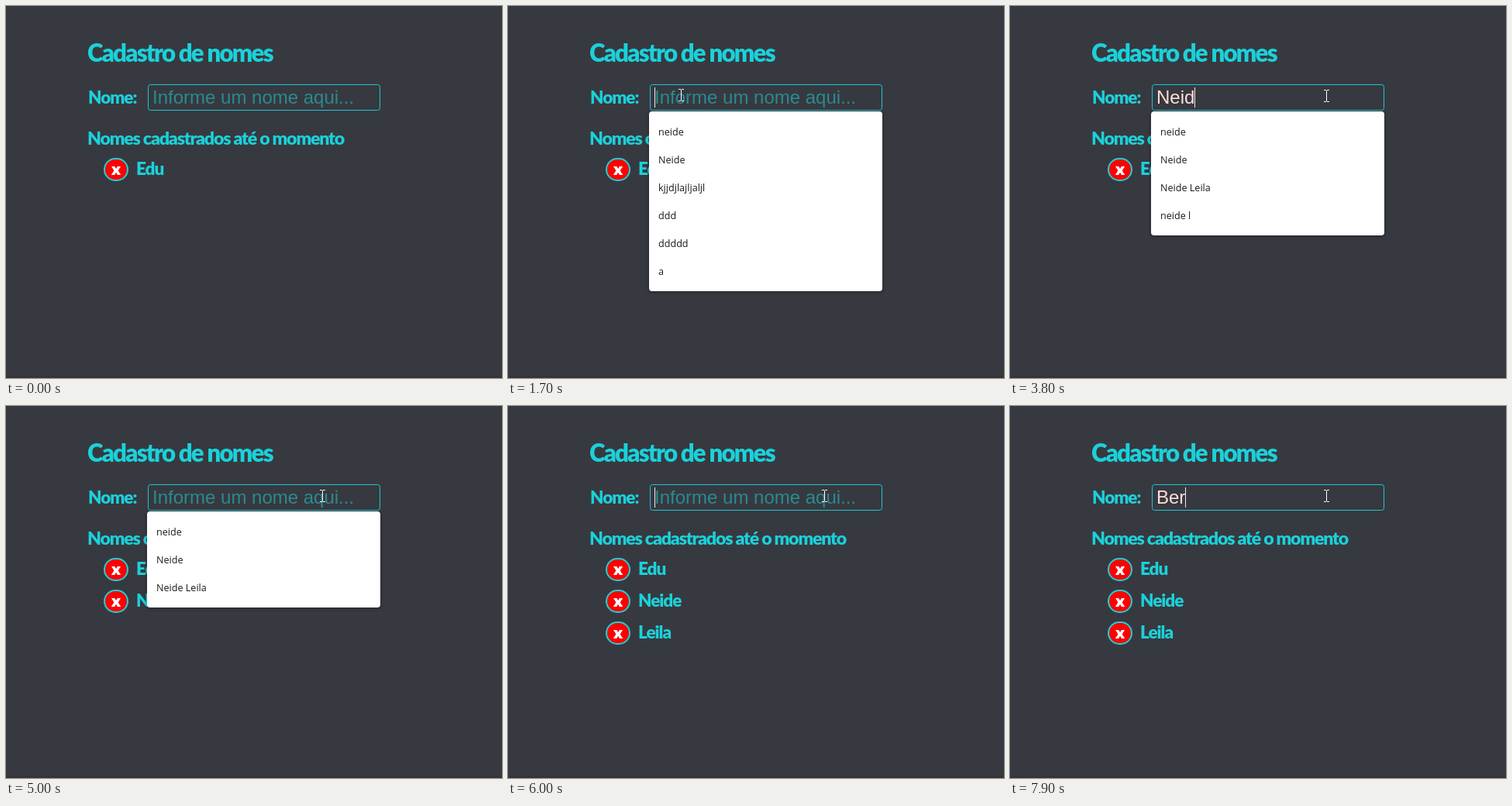
These frames come from a looping animation (640x480 px, 8000 ms). An HTML page:

```html
<!DOCTYPE html>
<html lang="pt">
<head>
<meta charset="utf-8">
<title>Cadastro de nomes</title>
<style>
  html, body { margin: 0; height: 100%; overflow: hidden; background: #373940; }
  svg { display: block; }
  text { white-space: pre; }
  .acme { font-family: Lato, sans-serif; font-weight: 900; font-size: 22.5px; letter-spacing: -1px; fill: #1bd1da; }
  .title { font-size: 31.2px; letter-spacing: -1.75px; }
  .sub { font-size: 23.2px; letter-spacing: -1.2px; }
  .x { font: 800 20px "Open Sans", sans-serif; fill: #fff; text-anchor: middle; }
  .field { font: 24px "Liberation Sans", Arial, sans-serif; }
  .option { font: 500 12.6px "Open Sans", sans-serif; fill: #1b1b1d; }
</style>
</head>
<body>
<svg width="640" height="480" viewBox="0 0 640 480">
  <rect width="640" height="480" fill="#373940"/>
  <rect y="477" width="640" height="3" fill="#393239"/>
  <text class="acme title" x="105" y="72">Cadastro de nomes</text>
  <text class="acme" x="106" y="126">Nome:</text>
  <text class="acme sub" x="105" y="179">Nomes cadastrados até o momento</text>
  <g id="list"></g>
  <rect x="183.5" y="101.5" width="299" height="33" rx="3" fill="none" stroke="#1bc8d1"/>
  <text id="hint" class="field" x="189" y="126" fill="#2a8b90">Informe um nome aqui...</text>
  <text id="value" class="field" x="189" y="126" fill="#ffdedb"></text>
  <rect id="caret" y="105" width="1" height="26" fill="#ffe8e6"/>
  <g id="popup" style="filter: drop-shadow(0 1px 2px #0006)">
    <svg id="clip" x="182" y="136" width="301" height="232">
      <rect id="sheet" width="301" rx="4" fill="#fff"/>
      <g id="options"></g>
    </svg>
  </g>
  <path id="beam" d="M-3.5-8H-.5M.5-8H3.5M-3.5 7H-.5M.5 7H3.5M0-7.5V6.5" fill="none" stroke="#fff"/>
  <path id="arrow" d="M0 0V16L3.7 12.5 6.2 18 8.5 17 6.1 11.5H11Z" fill="#fff" stroke="#000"/>
</svg>
<script>
const LOOP = 8000, BLINK = 500;
const $ = id => document.getElementById(id);
const show = (el, on) => el.setAttribute("visibility", on ? "visible" : "hidden");

// Each timeline entry holds from its time until the next one.
const names = [[0, "Edu"], [4500, "Neide"], [6000, "Leila"]];
const typing = [
  [1700, ""], [2700, "N"], [3200, "Ne"], [3700, "Nei"], [3800, "Neid"], [4000, "Neide"],
  [4500, ""], [5100, "L"], [5300, "Le"], [5500, "Lei"], [5600, "Leil"], [5800, "Leila"],
  [6000, ""], [7500, "B"], [7600, "Be"], [7900, "Ber"]
];
const all = ["neide", "Neide", "kjjdjlajljaljl", "ddd", "ddddd", "a"];
const matches = ["neide", "Neide", "Neide Leila", "neide l"];
const popups = [
  [1700, all], [2800, all, 166], [2900, matches], [4000, []],
  [5000, matches.slice(0, 3)], [5100, []]
];
const pointer = [
  [700, 68, 108], [800, 84, 104], [900, 108, 100], [1000, 136, 98],
  [1100, 166, 99], [1200, 200, 113], [1300, 222, 115], [1500, 223, 115],
  [1800, 246, 115], [1900, 310, 116], [2000, 376, 116], [2200, 408, 116]
];
const at = (line, t) => line.findLast(e => e[0] <= t);

$("list").innerHTML = names.map(([, name], i) => `<g transform="translate(0 ${i * 41})">
  <rect x="127" y="197" width="30" height="28" rx="14" fill="#f00" stroke="#1bd1da" stroke-width="2"/>
  <text class="x" x="142" y="218">x</text>
  <text class="acme" x="168" y="218">${name}</text></g>`).join("");

function drawField(t) {
  const [since, text] = at(typing, t) || [Infinity, ""];
  $("value").textContent = text;
  show($("hint"), !text);
  const end = text ? $("value").getComputedTextLength() : 0;
  $("caret").setAttribute("x", Math.floor(189 + end));
  show($("caret"), t >= since && Math.floor((t - since) / BLINK) % 2 === 0);
}

function drawPopup(t) {
  const [, rows, cut] = at(popups, t) || [0, []];
  const height = rows.length * 36 + 16;
  show($("popup"), rows.length);
  $("sheet").setAttribute("height", height);
  $("clip").setAttribute("height", cut || height);
  $("options").innerHTML = rows.map((row, i) =>
    `<text class="option" x="12" y="${31 + i * 36}">${row}</text>`).join("");
}

function drawPointer(t) {
  const [, x, y] = at(pointer, t) || [0, -99, -99];
  const inside = x >= 183;
  show($("beam"), inside);
  show($("arrow"), !inside);
  for (const id of ["beam", "arrow"])
    $(id).setAttribute("transform", `translate(${x + .5} ${y + .5})`);
}

function draw(now) {
  const t = now % LOOP;
  names.forEach(([time], i) => show($("list").children[i], t >= time));
  drawField(t);
  drawPopup(t);
  drawPointer(t);
  requestAnimationFrame(draw);
}
draw(0);
</script>
</body>
</html>
```
